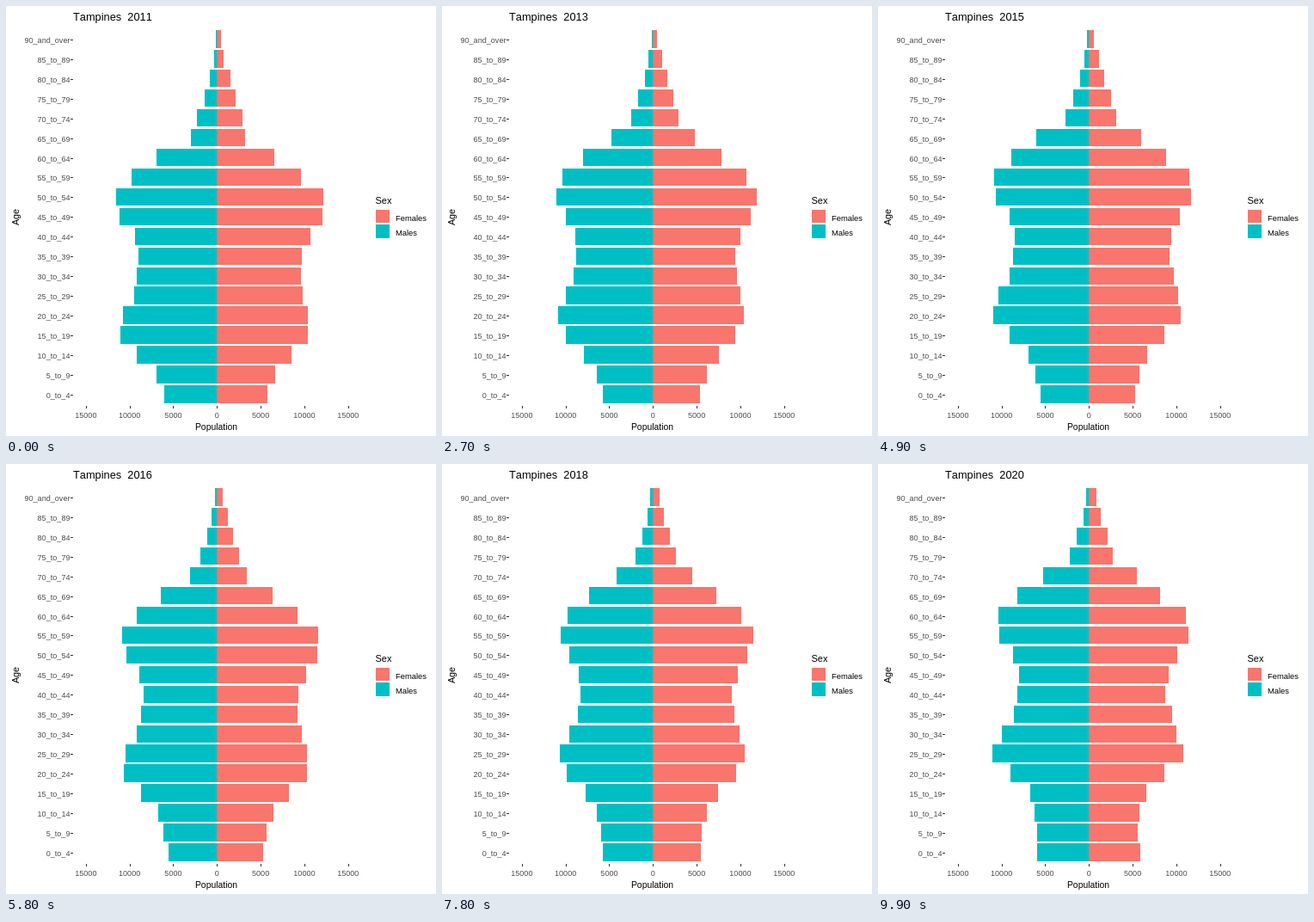
Recreate the animation shown at these times as an HTML page. Size 500 by 500 pixels, loop 10000 ms.

```html
<!DOCTYPE html>
<html lang="en">
<head>
<meta charset="utf-8">
<title>Population pyramid</title>
<style>
  html, body { margin: 0; width: 100%; height: 100%; overflow: hidden; background: #fff; }
  svg { display: block; width: 500px; height: 500px; font-family: "Liberation Sans", Arial, sans-serif; font-kerning: none; }
  rect { shape-rendering: crispEdges; }
  .title { font-size: 12.8px; white-space: pre; }
  .axis { font-size: 9.1px; fill: #4d4d4d; }
  .tick { fill: #333; }
  .female { fill: #f8766d; }
  .male { fill: #00bfc4; }
</style>
</head>
<body>
<svg viewBox="0 0 500 500">
  <g id="plot"></g>
  <text id="title" class="title" x="78" y="17"></text>
  <text x="244.5" y="493" font-size="10.4" text-anchor="middle">Population</text>
  <text transform="translate(15 245.5) rotate(-90)" font-size="10.8" text-anchor="middle">Age</text>
  <text x="429.5" y="230" font-size="11">Sex</text>
  <rect class="female" x="430" y="237" width="16" height="15"/>
  <rect class="male" x="430" y="254" width="16" height="16"/>
  <text x="453" y="250" font-size="9.4">Females</text>
  <text x="453" y="267" font-size="9.4">Males</text>
</svg>
<script>
const ROWS = 19, TOP = 38.71, STEP = 22.969, HALF = 0.45 * STEP;
const ZERO = 245, AXIS_ZERO = 245.3, UNIT = 50.83;
const LOOP = 10000, TICK = 100, TICKS_PER_YEAR = 11;
const YEARS = 9, YEARS_PER_ROW = 5;

// Age profiles of the first and last year, oldest group first, in pixels
const profiles = {
  male: {
    first: [1, 3, 8, 14, 23, 30, 70, 99, 117, 113, 95, 91, 93, 96, 109, 112, 93, 70, 61],
    last: [3, 6, 14, 22, 53, 83, 105, 104, 88, 81, 83, 87, 101, 112, 91, 68, 63, 60, 60]
  },
  female: {
    first: [5, 8, 16, 22, 30, 33, 67, 98, 124, 123, 109, 99, 98, 100, 106, 106, 87, 68, 59],
    last: [9, 14, 22, 28, 56, 83, 113, 116, 103, 93, 89, 97, 102, 110, 88, 67, 59, 57, 60]
  }
};

const plot = document.getElementById("plot");
const title = document.getElementById("title");

function add(name, attrs, text) {
  const el = document.createElementNS("http://www.w3.org/2000/svg", name);
  for (const key in attrs) el.setAttribute(key, attrs[key]);
  if (text !== undefined) el.textContent = text;
  return plot.appendChild(el);
}

function addBar(sex, row) {
  const mid = TOP + row * STEP;
  const y = Math.floor(mid - HALF);
  const el = add("rect", { class: sex, x: ZERO, y, height: Math.floor(mid + HALF) - y });
  return { el, sex, row };
}

const bars = [];
for (let row = 0; row < ROWS; row++) {
  bars.push(addBar("male", row), addBar("female", row));
  const age = 5 * (ROWS - 1 - row);
  const y = Math.round(TOP + row * STEP);
  add("rect", { class: "tick", x: 75, y, width: 3, height: 1 });
  add("text", { class: "axis", x: 74.5, y: y + 3.5, "text-anchor": "end" },
    row ? `${age}_to_${age + 4}` : "90_and_over");
}
for (let i = -3; i <= 3; i++) {
  const x = AXIS_ZERO + i * UNIT;
  add("rect", { class: "tick", x: Math.round(x), y: 465, width: 1, height: 3 });
  add("text", { class: "axis", x, y: 479, "text-anchor": "middle" }, Math.abs(i) * 5000);
}

// Linear between rows, extended past both ends
function sample(profile, row) {
  const i = Math.min(Math.max(Math.floor(row), 0), ROWS - 2);
  return profile[i] + (profile[i + 1] - profile[i]) * (row - i);
}

// Each generation moves up one row in five years; blend both profiles along that path
function barLength({ sex, row }, year) {
  const { first, last } = profiles[sex];
  const share = year / YEARS;
  const before = sample(first, row + year / YEARS_PER_ROW);
  const after = sample(last, row - (YEARS - year) / YEARS_PER_ROW);
  return Math.max(1, Math.round(before * (1 - share) + after * share));
}

function draw(tick) {
  const year = tick / TICKS_PER_YEAR;
  title.textContent = `Tampines  ${2011 + Math.round(year)}`;
  for (const bar of bars) {
    const length = barLength(bar, year);
    bar.el.setAttribute("x", bar.sex === "male" ? ZERO - length : ZERO);
    bar.el.setAttribute("width", length);
  }
}

const start = performance.now();
function play(now) {
  draw(Math.floor(Math.max(now - start, 0) % LOOP / TICK));
  requestAnimationFrame(play);
}
draw(0);
requestAnimationFrame(play);
</script>
</body>
</html>
```
